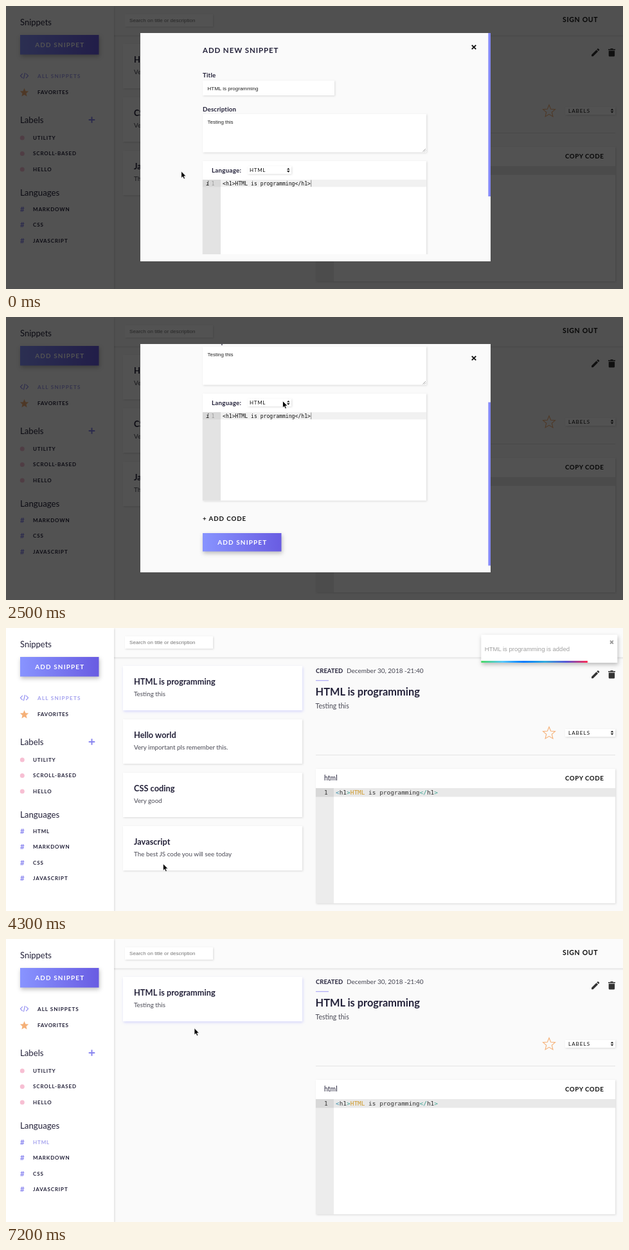
Animation of 960x440 px, one loop 7300 ms. Source, as an HTML page:

```html
<!DOCTYPE html>
<html lang="en">
<head>
<meta charset="utf-8">
<title>Snippets</title>
<style>
  html, body { margin: 0; width: 100%; height: 100%; overflow: hidden; background: #fafafa; }
  svg { display: block; width: 960px; height: 440px; }
  text { white-space: pre; font-family: Lato, sans-serif; }
  .arial { font-family: "Liberation Sans", Arial, sans-serif; }
  .mono { font-family: "DejaVu Sans Mono", monospace; }
  .bold { font-weight: 700; }
  .soft { filter: drop-shadow(1px 1px 1.5px rgba(0, 0, 0, .13)); }
  .glow { filter: drop-shadow(1px 2px 2px rgba(125, 130, 255, .28)); }
  .lift { filter: drop-shadow(1px 3px 3px rgba(0, 0, 0, .25)); }
</style>
</head>
<body>
<svg id="stage" viewBox="0 0 960 440"></svg>
<script>
const LOOP = 7300, STEP = 100;
const ADDED = 3700, FILTERED = 5800, TOAST_IN = 3643, TOAST_OUT = 6643;
const INK = '#24223a', PURPLE = '#8a86f0', PALE = '#a5a2ee', ORANGE = '#f5b077';

const text = (x, y, str, size, { cls = '', fill = INK, ls = 0, id = '' } = {}) =>
  `<text x="${x}" y="${y}" font-size="${size}" class="${cls}" fill="${fill}" letter-spacing="${ls}" ${id && `id="${id}"`}>${str}</text>`;
const bold = (x, y, str, size, opts = {}) => text(x, y, str, size, { ...opts, cls: 'bold' });
const arial = (x, y, str, size, fill = '#222') => text(x, y, str, size, { cls: 'arial', fill });
const mono = (x, y, str, size, fill = '#222') => text(x, y, str, size, { cls: 'mono', fill });
const box = (x, y, w, h, fill = '#fff', cls = '') =>
  `<rect x="${x}" y="${y}" width="${w}" height="${h}" fill="${fill}" class="${cls}"/>`;
const path = (d, attrs) => `<path d="${d}" ${attrs}/>`;
const group = (id, body, attrs = '') => `<g id="${id}" ${attrs}>${body}</g>`;
const item = (x, y, str, opts) => bold(x, y, str, 8, { ls: .85, ...opts });

function star(cx, cy, r, attrs) {
  const points = Array.from({ length: 10 }, (_, i) => {
    const a = i * Math.PI / 5, d = i % 2 ? r * .45 : r;
    return [cx + d * Math.sin(a), cy - d * Math.cos(a)].map(v => v.toFixed(1));
  });
  return `<polygon points="${points.join(' ')}" ${attrs}/>`;
}

const arrows = (x, y) => path(`M${x - 2.3} ${y - .8}h4.6l-2.3-2.8zM${x - 2.3} ${y + .8}h4.6l-2.3 2.8z`, 'fill="#222"');

const button = (x, y, h, id = '') =>
  box(x, y, 122.5, h, 'url(#cool)', 'lift') +
  (id && `<rect id="${id}" x="${x}" y="${y}" width="122.5" height="${h}" fill="url(#warm)"/>`) +
  bold(x + 23.3, y + h / 2 + 4, 'ADD SNIPPET', 10, { fill: '#fff', ls: 1.1 });

const card = (id, title, note, active) => group(id,
  box(182, 59, 279, 69, '#fff', active ? 'glow' : 'soft') +
  bold(199, 88, title, 12.8) + text(199, 106, note, 9.85, { fill: '#4a4a55' }));

const language = (id, name) => group(id,
  bold(22, 319.5, '#', 11.5, { fill: PURPLE }) + item(42, 318.5, name, { id: id + 'Name' }));

const gradient = (id, ...colors) => `<linearGradient id="${id}">` + colors.map((c, i) =>
  `<stop offset="${i / (colors.length - 1)}" stop-color="${c}"/>`).join('') + '</linearGradient>';

const sidebar =
  box(0, 0, 168, 440, '#fff', 'soft') +
  text(22, 29.5, 'Snippets', 13) + button(22, 45, 30.5) +
  path('M25.8 105l-3.3 3.6 3.3 3.6M31.2 105l3.3 3.6-3.3 3.6M29.6 104l-2.2 9.2', `fill="none" stroke="${PURPLE}" stroke-width="1.1"`) +
  bold(49, 111.5, 'ALL SNIPPETS', 8.2, { ls: 1.2, id: 'all' }) +
  star(28.5, 134.8, 7, `fill="${ORANGE}"`) + bold(49, 137.4, 'FAVORITES', 8.2, { ls: .6 }) +
  text(22, 181.5, 'Labels', 13.2) +
  path('M133.5 172.2v9.6M128.7 177h9.6', `stroke="${PURPLE}" stroke-width="2"`) +
  ['UTILITY', 'SCROLL-BASED', 'HELLO'].map((name, i) =>
    `<circle cx="25.3" cy="${205 + i * 24.5}" r="3.5" fill="#f7bfd3"/>` + item(42, 207.5 + i * 24.6, name)).join('') +
  text(22, 294.5, 'Languages', 13.3) +
  language('html', 'HTML') + language('markdown', 'MARKDOWN') + language('css', 'CSS') + language('js', 'JAVASCRIPT');

const detail =
  bold(482, 70, 'CREATED', 9.5) +
  text(530, 70, 'December 30, 2018 -21:40', 10, { fill: '#444450' }) +
  box(482, 81, 20, 1.3, '#b3b0f5') +
  bold(481.5, 104.5, 'HTML is programming', 16.4) +
  text(481.5, 124.5, 'Testing this', 10.5, { fill: '#4a4a55' }) +
  path('M3 17.25V21h3.75L17.81 9.94l-3.75-3.75zM20.71 7.04a1 1 0 0 0 0-1.41l-2.34-2.34a1 1 0 0 0-1.41 0l-1.83 1.83 3.75 3.75z',
    'transform="translate(909 64) scale(.68)" fill="#333"') +
  path('M937 67h3l1-1h3l1 1h3v1.5h-11zM937.7 69.6h9.4v7.4q0 1.5-1.5 1.5h-6.4q-1.5 0-1.5-1.5z', 'fill="#333"') +
  star(845, 163.8, 10, `fill="none" stroke="${ORANGE}" stroke-width="1.1"`) +
  box(870, 157, 78, 12, '#fff', 'soft') + text(875, 166, 'LABELS', 8, { ls: 1.05, fill: '#111' }) + arrows(943, 163) +
  box(482, 197, 466, 1, '#e4e4e4') +
  box(482, 219, 466, 209, '#fff', 'soft') +
  text(495, 237, 'html', 10.5) + bold(870, 236.8, 'COPY CODE', 9.8, { ls: .5, fill: '#111' }) +
  box(482, 249, 28, 179, '#ececec') + box(510, 249, 438, 13.5, '#e9e9e9') + box(482, 249, 28, 13.5, '#d8d8d8') +
  mono(495, 259.2, '1', 9.43, '#333') +
  mono(513, 259.2, ['#3d8fa8', '&lt;', '#333', 'h1', '#3aa08f', '&gt;', '#cf9a2c', 'HTML', '#333', ' is programming',
    '#3aa08f', '&lt;/', '#333', 'h1', '#3aa08f', '&gt;'].map((s, i) => i % 2 ? s + '</tspan>' : `<tspan fill="${s}">`).join(''), 9.43);

const page =
  box(0, 0, 960, 440, '#fafafa') + box(160, -10, 810, 55.5, '#fbfbfb', 'soft') +
  box(185, 13, 137, 19, '#fff', 'soft') + arial(192, 25.3, 'Search on title or description', 8.1, '#757575') +
  bold(866, 25.3, 'SIGN OUT', 10.5, { ls: .7, fill: '#111' }) +
  card('card0', 'HTML is programming', 'Testing this', true) +
  card('card1', 'Hello world', 'Very important pls remember this.') +
  card('card2', 'CSS coding', 'Very good') +
  card('card3', 'Javascript', 'The best JS code you will see today') +
  detail + sidebar;

const form =
  bold(306, 73.2, 'ADD NEW SNIPPET', 11.5, { ls: .9 }) +
  bold(306, 110.8, 'Title', 9.8, { ls: .15 }) +
  box(306, 116, 205, 23, '#fff', 'soft') + arial(313.5, 130.8, 'HTML is programming', 8) +
  bold(306, 163.6, 'Description', 9.8, { ls: .15 }) +
  box(306, 168, 348, 59.5, '#fff', 'soft') + arial(313.5, 183.3, 'Testing this', 8) +
  path('M648.5 226.5l4.5-4.5M651 226.5l2-2', 'stroke="#777" stroke-width=".7"') +
  box(306, 241, 348, 166.5, '#fff', 'soft') +
  bold(320, 258.6, 'Language:', 9.8, { ls: .25 }) +
  box(376, 249, 68, 12, '#fff', 'soft') + text(379, 258, 'HTML', 8, { ls: .7, fill: '#111' }) + arrows(439.3, 255.3) +
  box(306, 270, 28, 137.5, '#e3e3e3') + box(334, 270, 320, 11.3, '#f1f1f1') + box(306, 270, 28, 11.3, '#d8d8d8') +
  `<text x="311.5" y="278.6" font-size="8" class="mono bold" font-style="italic" fill="#333">i</text>` +
  mono(319.5, 278.8, '1', 8.15, '#999') +
  mono(337, 278.8, '&lt;h1&gt;HTML is programming&lt;/h1&gt;', 8.15, '#111') +
  box(474.3, 270.5, .9, 10.5, '#888') +
  bold(306, 438.8, '+ ADD CODE', 9.8, { ls: .9, fill: '#111' }) +
  button(306, 458, 28.5, 'hover');

const modal =
  box(0, 0, 960, 440, 'rgba(0,0,0,.68)') + box(209, 42, 545, 355, '#fafafa') +
  `<g clip-path="url(#view)">${group('form', form)}</g>` +
  path('M724.8 60.8l6.4 6.4M731.2 60.8l-6.4 6.4', 'stroke="#111" stroke-width="1.9"') +
  group('thumb', box(750.4, 42, 3.6, 254, '#8388fb'));

const toast =
  box(740, 10.5, 212, 43.5, '#fff', 'lift') + arial(745.5, 35.5, 'HTML is programming is added', 9.5, '#a0a0a0') +
  path('M940.7 19.7l4.8 4.8M945.5 19.7l-4.8 4.8', 'stroke="#999" stroke-width="1.8"') +
  '<rect id="bar" x="740" y="51" height="3" fill="url(#rainbow)"/>';

const cursor =
  path('M0 0V10.6L2.4 8.4 4 12.1 5.9 11.3 4.3 7.7H7.5Z', 'id="arrow" fill="#000" stroke="#fff" stroke-width=".8"') +
  path('M-1.2 7V1Q0-1 1.2 1V4.6Q2.6 3.7 3.4 4.9 4.8 4.3 5.4 5.6 7 5.2 7 7V9L5.8 12.6H-.2L-4 7.6Q-3.5 5.8-1.2 7.6ZM1.2 4.6V7M3.4 4.9V7M5.4 5.6V7.3',
    'id="hand" fill="#fff" stroke="#111" stroke-width="1"');

document.getElementById('stage').innerHTML =
  '<defs>' + gradient('cool', '#8894ff', '#695ce2') + gradient('warm', '#675be2', '#b592f4') +
  gradient('rainbow', '#4cd964', '#5ac8fa', '#007aff', '#34aadc', '#5856d6', '#ff2d55') +
  `<clipPath id="view">${box(209, 42, 545, 344)}</clipPath></defs>` +
  page + group('modal', modal) + group('toast', toast) + group('cursor', cursor);

const $ = id => document.getElementById(id);
const show = (id, on) => $(id).setAttribute('display', on ? 'inline' : 'none');
const move = (id, x, y) => $(id).setAttribute('transform', `translate(${x} ${y})`);
const clamp = v => Math.min(1, Math.max(0, v));
const linear = u => u, smooth = u => u * u * (3 - 2 * u), easeOut = u => 1 - (1 - u) ** 3;

// Keys are [time, value]; each segment is eased on its own.
function track(t, keys, ease = smooth) {
  if (t <= keys[0][0]) return keys[0][1];
  const i = keys.findIndex(k => k[0] >= t);
  if (i < 0) return keys[keys.length - 1][1];
  const [t0, a] = keys[i - 1], [t1, b] = keys[i];
  return a + (b - a) * ease((t - t0) / (t1 - t0));
}

const SCROLL = [[850, 0], [1200, 32], [1700, 88], [2100, 122]];
const POINTER = [
  [0, 272.7, 257], [1800, 272.2, 257], [2400, 430, 129], [2500, 430.5, 130.5], [3100, 362.5, 350.5], [4050, 362.5, 350.5],
  [4500, 160, 378], [4800, 75, 354], [5100, 55.3, 315.5], [6100, 55.3, 315.5], [6800, 293, 138.5]];
const POINTER_X = POINTER.map(([t, x]) => [t, x]), POINTER_Y = POINTER.map(([t, , y]) => [t, y]);

const bounceIn = [[0, 1800], [420, -15], [525, 6], [630, -3], [700, 0]];
const bounceOut = [[0, 0], [140, -12], [700, 1200]];

function draw(t) {
  const added = t >= ADDED, filtered = t >= FILTERED;
  show('modal', !added);
  const scroll = track(t, SCROLL, linear);
  move('form', 0, -scroll);
  move('thumb', 0, scroll * .742);
  $('hover').setAttribute('opacity', clamp((t - 2950) / 300));

  for (let i = 0; i < 4; i++) {
    show('card' + i, i ? !filtered : added);
    move('card' + i, 0, (added ? i : i - 1) * 83);
  }

  show('html', added);
  const shift = added ? 24.6 : 0;
  move('markdown', 0, shift);
  move('css', 0, 24.6 + shift);
  move('js', 0, 49.2 + (added ? track(t, [[ADDED, 18.6], [ADDED + 100, 24.6]]) : 0));
  $('htmlName').setAttribute('fill', t >= 5000 ? PALE : INK);
  $('all').setAttribute('fill', filtered ? INK : PALE);
  $('all').setAttribute('letter-spacing', filtered ? .95 : 1.2);

  show('toast', t >= TOAST_IN && t < TOAST_OUT + 700);
  move('toast', t < TOAST_OUT ? track(t - TOAST_IN, bounceIn, easeOut) : track(t - TOAST_OUT, bounceOut), 0);
  $('bar').setAttribute('width', 212 * clamp((TOAST_OUT - t) / (TOAST_OUT - TOAST_IN)));

  const hand = t >= 3050 && t < 4250 || t >= 4750 && t < 6200;
  show('hand', hand);
  show('arrow', !hand);
  move('cursor', track(t, POINTER_X), track(t, POINTER_Y));
}

function tick() {
  draw(Math.floor(performance.now() % LOOP / STEP) * STEP);
  requestAnimationFrame(tick);
}
tick();
</script>
</body>
</html>
```
